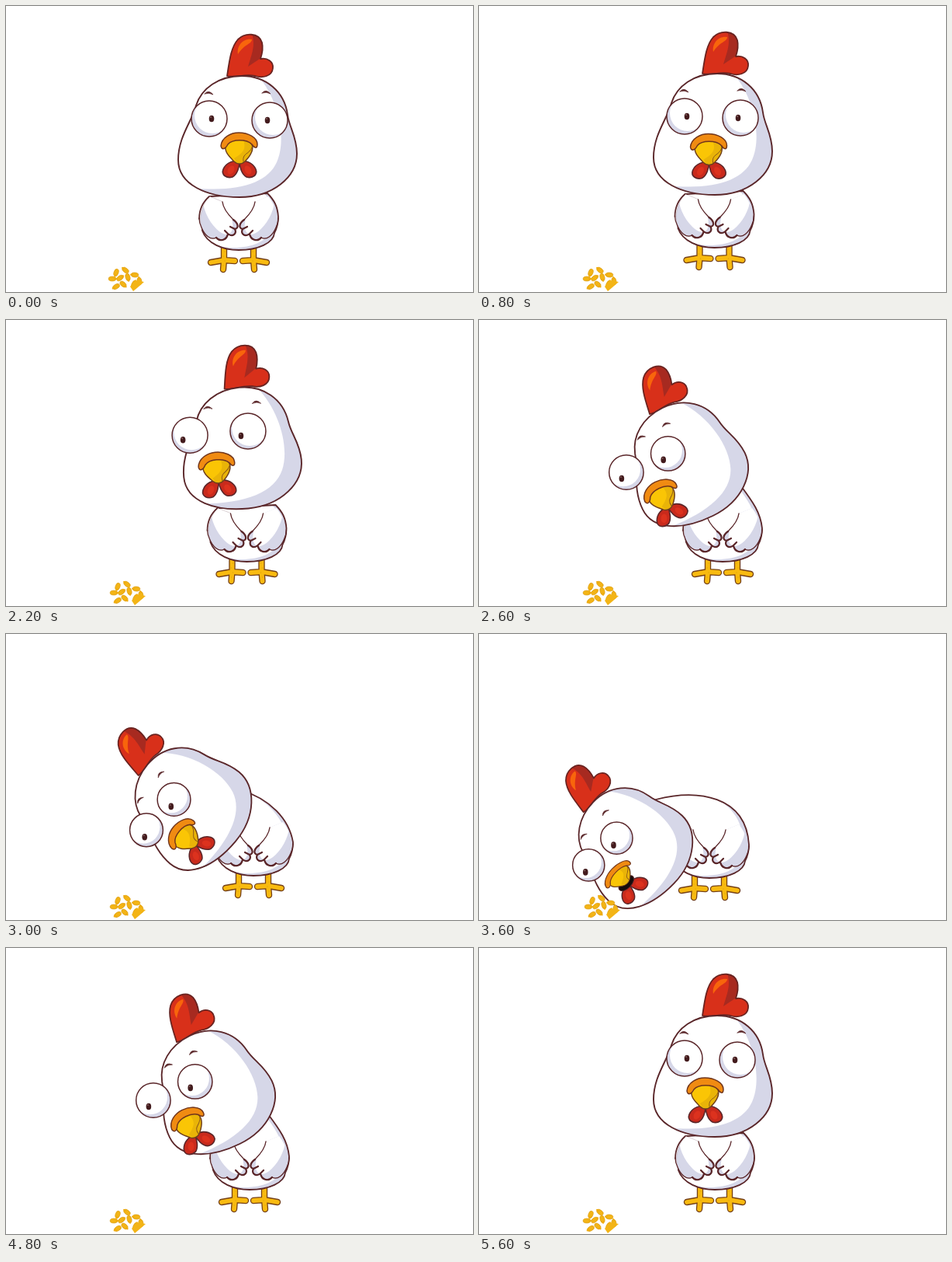
An HTML page with a canvas for the animation above (5.8 s loop, 602 px wide and 368 px high).

```html
<!DOCTYPE html>
<html lang="en">
<head>
<meta charset="utf-8">
<title>Pecking chicken</title>
<style>
html, body { margin: 0; width: 100%; height: 100%; overflow: hidden; background: #fff; }
canvas { display: block; }
</style>
</head>
<body>
<canvas id="stage" width="602" height="368"></canvas>
<script>
const ctx = document.getElementById('stage').getContext('2d');
const LOOP = 5800, STEP = 200;
const INK = '#5a2629', SHADE = '#d6d7e8', WHITE = '#fff';
const RED = '#d8301a', DARK_RED = '#a72a20', FLAME = '#f8650c';
const YELLOW = '#fac505', GOLD = '#dda60c', ORANGE = '#f08b12';

// Pose: head x, y, angle; eye x left, right; gaze x, y; beak x, y; body x, y; bend
const front = [299, 168, 0, -37, 41, 0, 0, 1, 18, -5, 3, 0];
const lifted = [302, 165, 0, -37, 39, 0, 0, -2, 20, -2, 0, 0];
const rest = [302, 165, 0, -37, 31, 0, 0, -11, 25, -1, 0, 0];
const glance = [303, 165, 0, -47, 22, -4, 0, -12, 25, 0, 0, 0];
const turned = [303, 165, -5.5, -64, 11, -9, 6, -34, 25, 5.5, 0, 0];
const leaning = [266, 184, -26, -75, -15, -6, 8, -47, 28, 9, 0, 1];
const bowed = [237, 220, -50, -63, -8, -3, 9, -37, 25, 14, 0, 2];
const peck = [173, 280, -53, -62, -8, -3, 9, -40, 22, -8, 2, 4];
const chew = [197, 271, -46, -61, -8, -4, 9, -43, 20, -8, 3, 3];

const timeline = [
  [0, front], [200, lifted], [1400, rest], [1600, glance], [2200, turned],
  [2600, leaning], [3000, bowed], [3400, peck], [3600, chew], [4000, peck],
  [4800, leaning], [5200, turned], [5600, rest]
];

// Back curve for each bend level: two controls, neck top, neck bottom
const backs = [
  [355, 255, 351, 247, 342, 238, 268, 242],
  [354, 248, 344, 234, 329, 214, 262, 258],
  [351, 238, 326, 212, 289, 201, 270, 262],
  [352, 205, 290, 196, 236, 210, 236, 288],
  [352, 198, 280, 190, 200, 220, 200, 285]
];

const mix = (a, b, k) => a.map((v, i) => v + (b[i] - v) * k);

function poseAt(t) {
  let i = timeline.length - 1;
  while (timeline[i][0] > t) i--;
  const [t0, a] = timeline[i];
  if (i === timeline.length - 1) return a;
  const [t1, b] = timeline[i + 1];
  return mix(a, b, (t - t0) / (t1 - t0));
}

function backAt(bend) {
  const i = Math.min(Math.floor(bend), backs.length - 2);
  return mix(backs[i], backs[i + 1], bend - i);
}

const shapes = {
  head: new Path2D('M5-78C-25-78-47-62-54-40C-59-20-77 0-77 30C-77 62-40 78 2 78C45 78 76 52 76 22C76 0 66-12 64-28C60-58 36-78 5-78Z'),
  headLight: new Path2D('M14-90C52-58 64 2 50 33C38 60 0 72-60 66L-100 66V-90Z'),
  comb: new Path2D('M-14-78C-11-98-9-115 0-125C9-134 27-134 31-121C33-113 31-106 29-100C38-102 46-96 45-88C44-77 31-75 22-78C8-81-4-75-14-78Z'),
  combDark: new Path2D('M17-135C24-118 17-105 13-90L28-100L45-110V-140Z'),
  combFlame: new Path2D('M0-106C-2-118 8-127 18-125C18-119 8-119 0-106Z'),
  lip: new Path2D('M-23-6C-22-17-10-23 0-23C12-23 24-17 24-8C24-2 20-3 17-8C10-15-8-15-14-8C-17-2-22 0-23-6Z'),
  bill: new Path2D('M-17-8C-8-18 10-18 17-8C20 0 14 8 8 14C4 18-2 18-6 14C-12 8-19 2-17-8Z'),
  billDark: new Path2D('M5-16C10-4 8 2-6 10L0 20L24 6L18-14Z'),
  wattle: new Path2D('M1 14C8 12 18 15 22 24C25 32 17 36 10 34C4 31 1 21 1 14Z'),
  wing: new Path2D('M284 249C285 258 291 265 298 272C304 276 306 283 300 284C303 290 297 295 291 290C290 298 281 301 276 295C269 299 261 292 257 282C253 270 257 254 267 242Z'),
  wingLine: new Path2D('M284 249C285 258 291 265 298 272C304 276 306 283 300 284C303 290 297 295 291 290C290 298 281 301 276 295C269 299 261 292 257 282C254 276 254 272 254 270'),
  wingTips: new Path2D('M298 272C304 276 306 283 300 284L294 281M300 284C303 290 297 295 291 290L287 286M291 290C290 298 281 301 276 295')
};

function paint(path, fill, line, width = 1.6) {
  if (fill) { ctx.fillStyle = fill; ctx.fill(path); }
  if (line) { ctx.strokeStyle = line; ctx.lineWidth = width; ctx.stroke(path); }
}

function group(draw) {
  ctx.save();
  draw();
  ctx.restore();
}

function oval(x, y, rx, ry, angle = 0) {
  const p = new Path2D();
  p.ellipse(x, y, rx, ry, angle, 0, Math.PI * 2);
  return p;
}

function seeds(dx) {
  const spots = [[137, 351], [142, 343], [154, 340], [147, 350], [157, 349],
    [166, 346], [165, 358], [151, 358], [142, 361], [172, 354]];
  group(() => {
    ctx.translate(dx, 0);
    spots.forEach(([x, y], i) => {
      const a = i * 1.9;
      paint(oval(x, y, 4.8, 2.9, a), '#f3b416', '#dda018', 0.8);
      paint(oval(x + 4 * Math.cos(a), y + 4 * Math.sin(a), 2, 1.3, a), '#efac10');
    });
    paint(new Path2D('M160 361L167 353L178 355L170 362L164 367Z'), '#f3b416');
  });
}

function foot(x, flip) {
  group(() => {
    ctx.translate(x, 0);
    ctx.scale(flip, 1);
    const p = new Path2D('M0 303V324L-17 327M0 324L-1 336M0 324L14 325');
    paint(p, null, '#744018', 8.4);
    paint(p, null, '#f8ba10', 5.8);
    for (let i = 0; i < 5; i++) {
      paint(oval(i % 2 ? 1 : -1, 307 + i * 6, 0.7, 0.7), GOLD);
    }
  });
}

function wing(flip) {
  group(() => {
    if (flip) { ctx.translate(610, 0); ctx.scale(-1, 1); }
    paint(shapes.wing, SHADE);
    group(() => {
      ctx.clip(shapes.wing);
      paint(oval(278, 263, 14, 31, -0.5), WHITE);
    });
    paint(flip ? shapes.wingLine : shapes.wing, null, 'rgba(90,38,41,.3)', 0.6);
    paint(shapes.wingLine, null, INK, 1.3);
    paint(shapes.wingTips, null, INK, 2.2);
    if (!flip) paint(new Path2D('M254 271C254 258 259 249 267 242'), null, INK, 1.7);
  });
}

function body(x, y, bend) {
  const [ax, ay, bx, by, ex, ey, nx, ny] = backAt(bend);
  const p = new Path2D();
  p.moveTo(nx, ny);
  p.quadraticCurveTo((nx + 255) / 2 - 4, 263, 258, 286);
  p.bezierCurveTo(264, 303, 285, 311, 305, 311);
  p.bezierCurveTo(330, 311, 350, 302, 351, 289);
  p.quadraticCurveTo(356, 280, 356, 268);
  p.bezierCurveTo(ax, ay, bx, by, ex, ey);
  p.closePath();
  group(() => {
    ctx.translate(x, y);
    foot(286, 1);
    foot(324, -1);
    paint(p, SHADE);
    group(() => {
      ctx.clip(p);
      ctx.translate(-7, -3);
      paint(p, WHITE);
    });
    paint(p, null, INK, 1.8);
    wing(false);
    wing(true);
  });
}

function beak(x, y, open) {
  group(() => {
    ctx.translate(x, y);
    for (const side of [-1, 1]) {
      group(() => {
        if (side < 0) ctx.translate(2, 0);
        ctx.scale(side, 1);
        paint(shapes.wattle, '#c92a1c', INK, 1.6);
        paint(oval(12, 25, 4, 6, -0.5), '#dc321e');
      });
    }
    if (open) paint(oval(0, 11, 13, 7), '#160c0c', INK, 1);
    if (open) ctx.scale(1, 0.72);
    paint(shapes.bill, YELLOW);
    group(() => {
      ctx.clip(shapes.bill);
      paint(shapes.billDark, '#e9b408');
    });
    paint(shapes.bill, null, '#70401c', 1.5);
    paint(new Path2D('M17-4C14 5 4 3 6 14'), null, '#8c5818', 1);
    paint(shapes.lip, ORANGE, '#70351c', 1.5);
  });
}

function eye(x, y, r, px, py, shadeX) {
  const ball = oval(x, y, r, r);
  paint(ball, SHADE);
  group(() => {
    ctx.clip(ball);
    paint(oval(x + shadeX, y - 4, r, r), WHITE);
  });
  paint(ball, null, INK, 1.5);
  paint(oval(x + px, y + py, 3.3, 4.3), '#431b1d');
  paint(oval(x + px - 1, y + py - 2, 0.8, 0.9), '#96706f');
}

function brow(x, y) {
  paint(new Path2D(`M${x - 5} ${y + 1}Q${x} ${y - 5} ${x + 6} ${y + 2}Q${x + 1} ${y - 1} ${x - 5} ${y + 1}`), INK, INK, 0.7);
}

function head(pose, open) {
  const [hx, hy, deg, e1, e2, px, py, kx, ky, , , bend] = pose;
  const angle = deg * Math.PI / 180;
  const size = 1 - bend * 0.018;
  group(() => {
    ctx.translate(hx, hy);
    ctx.rotate(angle);
    ctx.scale(size, size);
    paint(shapes.comb, RED);
    group(() => {
      ctx.clip(shapes.comb);
      paint(shapes.combDark, DARK_RED);
    });
    paint(shapes.combFlame, FLAME);
    paint(shapes.comb, null, '#692320', 1.8);
    paint(shapes.head, SHADE);
    group(() => {
      ctx.clip(shapes.head);
      paint(shapes.headLight, WHITE);
    });
    paint(shapes.head, null, INK, 1.9);
    brow(-38, -56);
    brow(Math.min(36, e2 + 14), -57);
  });

  // Eyeballs keep their shading and gaze upright
  const place = (x, y) => [
    hx + size * (x * Math.cos(angle) - y * Math.sin(angle)),
    hy + size * (x * Math.sin(angle) + y * Math.cos(angle))
  ];
  const r = 23 - bend * 0.8;
  const squint = Math.max(0, 3 + px * 0.75);
  const shadeX = 4 - 8 * Math.min(1, -deg / 26);
  eye(...place(e1, -23), r, px + squint, py, shadeX);
  eye(...place(e2, -21), r, px - squint, py, shadeX);

  group(() => {
    ctx.translate(hx, hy);
    ctx.rotate(angle);
    ctx.scale(size, size);
    beak(kx, ky, open);
  });
}

function draw(time) {
  let t = Math.floor((time % LOOP) / STEP) * STEP;
  if (t === 3800) t = 3600;
  const pose = poseAt(t);
  const chewing = t === 3600;
  ctx.fillStyle = WHITE;
  ctx.fillRect(0, 0, 602, 368);
  body(pose[9], pose[10], pose[11]);
  head(pose, chewing);
  seeds(chewing ? 4 : t ? 2 : 0);
}

ctx.lineCap = ctx.lineJoin = 'round';
const start = performance.now();
function tick() {
  draw(performance.now() - start);
  requestAnimationFrame(tick);
}
tick();
</script>
</body>
</html>
```
